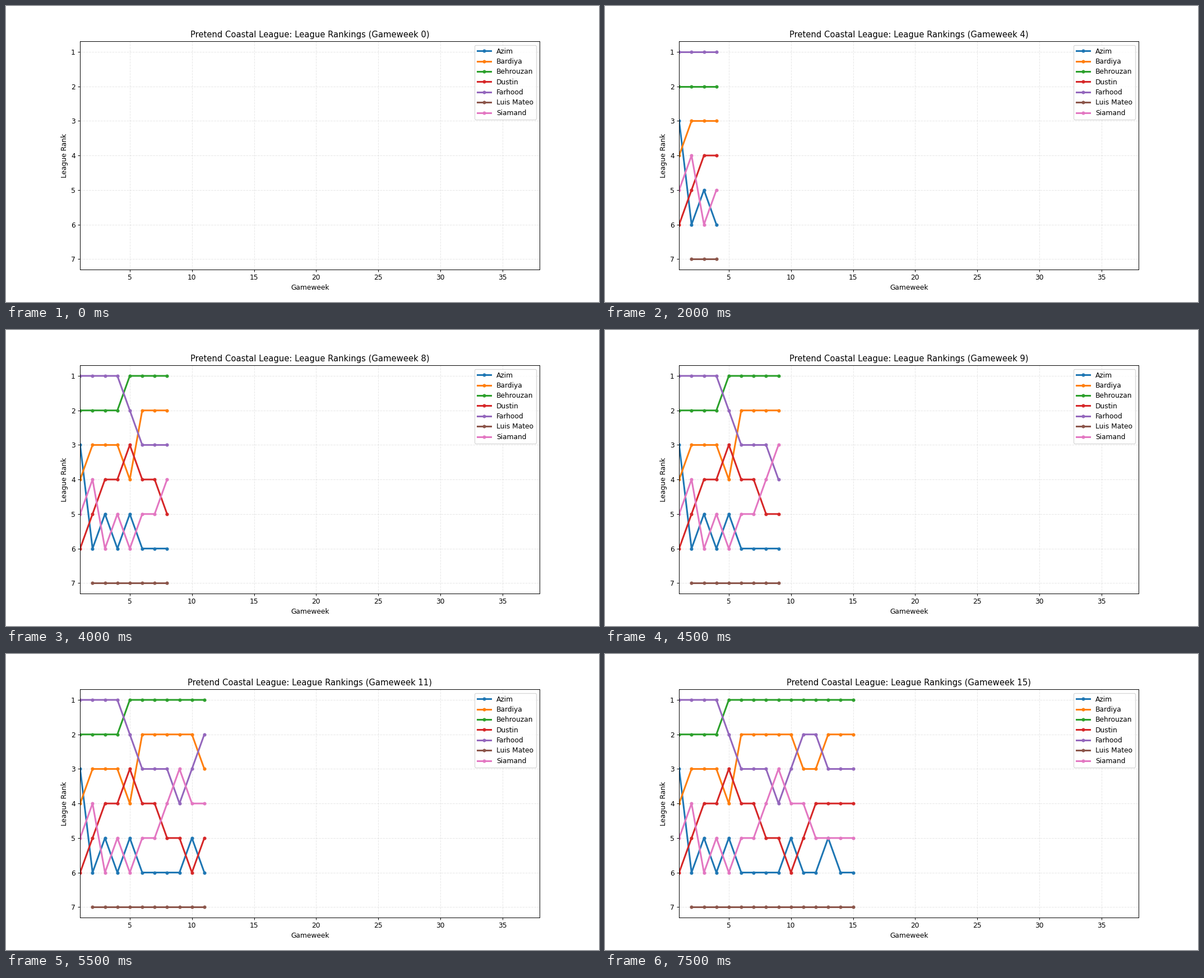
A matplotlib script that plays this animation: 1058 by 529 pixels, repeating every 8 s.

```python
import math

import matplotlib.pyplot as plt
from matplotlib.animation import FuncAnimation

WEEKS = 15
SEASON = 38
TITLE = "Pretend Coastal League: League Rankings (Gameweek {})"

# Opening table, best first
START = ["Farhood", "Behrouzan", "Azim", "Bardiya", "Siamand", "Dustin", "Luis Mateo"]

# Week: ranks overtaken, in turn, by the player one place below
OVERTAKES = {
    2: (3, 4, 5), 3: (4, 5), 4: (5,), 5: (1, 3, 5), 6: (3, 2, 5), 8: (4,),
    9: (3,), 10: (3, 5), 11: (2, 5), 12: (4,), 13: (2,),
}


def play_season():
    order = list(START)
    history = {name: [] for name in sorted(START)}
    for week in range(1, WEEKS + 1):
        for rank in OVERTAKES.get(week, ()):
            order[rank - 1], order[rank] = order[rank], order[rank - 1]
        for rank, name in enumerate(order, 1):
            history[name].append(rank)
    history["Luis Mateo"][0] = math.nan  # joins in week 2
    history["Azim"][12] = history["Siamand"][12]  # level in week 13
    return history


ranks = play_season()

plt.rcParams["font.family"] = "DejaVu Sans"
fig, ax = plt.subplots(figsize=(12, 6), dpi=88.1667)

lines = {
    name: ax.plot([], [], marker="o", markersize=4, linewidth=2.5, label=name)[0]
    for name in ranks
}

ax.set_xlim(1, SEASON)
ax.set_ylim(len(ranks) + 0.3, 0.7)
ax.set_yticks(range(1, len(ranks) + 1))
ax.set_xlabel("Gameweek")
ax.set_ylabel("League Rank")
ax.grid(True, linestyle="--", alpha=0.3)
ax.legend(loc="upper right", labelspacing=0.44)
title = ax.set_title(TITLE.format(0))


def update(week):
    weeks = range(1, week + 1)
    for name, line in lines.items():
        line.set_data(weeks, ranks[name][:week])
    title.set_text(TITLE.format(week))
    return [*lines.values(), title]


anim = FuncAnimation(
    fig, update, frames=WEEKS + 1, init_func=lambda: update(0),
    interval=500, repeat=True, repeat_delay=0, blit=False,
)

plt.show()
```
